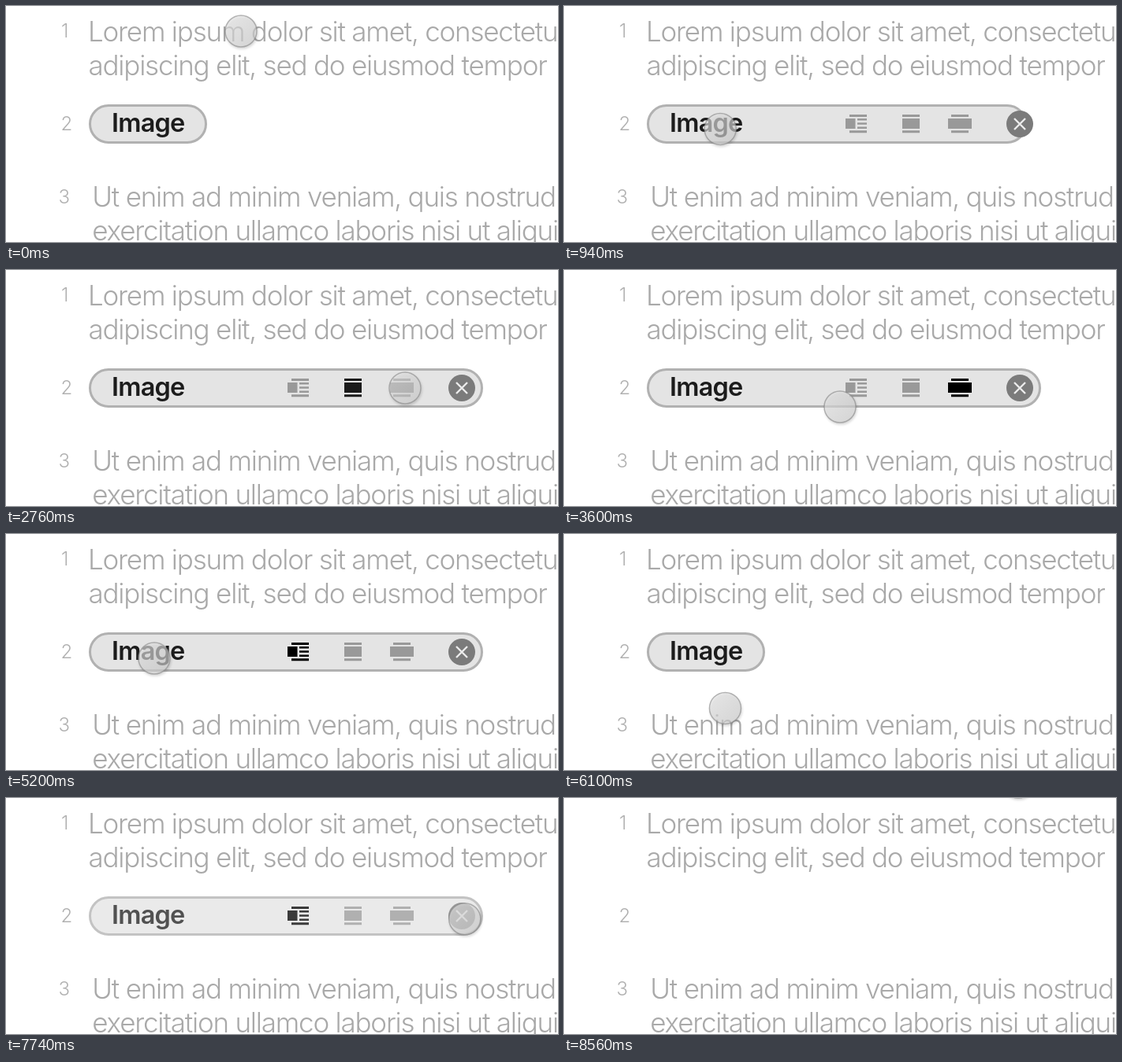
Animation of 700 by 300 pixels, one loop 8.58 s. Source, as an HTML page:

```html
<!DOCTYPE html>
<html lang="en">
<head>
<meta charset="utf-8">
<title>Image block toolbar</title>
<style>
  html, body { margin: 0; width: 100%; height: 100%; overflow: hidden; background: #fff; }
  svg { display: block; width: 700px; height: 300px; }
  text { font-family: Inter, "Liberation Sans", sans-serif; font-optical-sizing: none; }
  .body { font-size: 35px; font-weight: 300; letter-spacing: -1.22px; fill: #a9a9a9; }
  .num { font-size: 24px; font-weight: 300; fill: #b0b0b0; }
  .label { font-size: 32.5px; font-weight: 600; letter-spacing: -.8px; fill: #1c1c1c; }
  #cursor { filter: drop-shadow(1px 2px 1.5px rgba(0, 0, 0, .22)); }
</style>
</head>
<body>
<svg viewBox="0 0 700 300">
  <defs>
    <linearGradient id="glass" x1="0" y1="0" x2="1" y2="1">
      <stop offset="0" stop-color="#ececec"/>
      <stop offset="1" stop-color="#d0d0d0"/>
    </linearGradient>
  </defs>

  <text class="num" x="70" y="39.5">1</text>
  <text class="num" x="69.5" y="158">2</text>
  <text class="num" x="66.5" y="250.5">3</text>
  <text class="body" x="104" y="45">Lorem ipsum dolor sit amet, consectetur</text>
  <text class="body" x="104.5" y="88">adipiscing elit, sed do eiusmod tempor</text>
  <text class="body" x="109.3" y="255">Ut enim ad minim veniam, quis nostrud</text>
  <text class="body" x="109.3" y="298">exercitation ullamco laboris nisi ut aliquip</text>

  <g id="block">
    <rect id="pill" x="106.5" y="126.5" height="47" rx="23.5" fill="#e4e4e4" stroke="#b1b1b1" stroke-width="3"/>
    <text class="label" x="134" y="160">Image</text>
    <g id="tools">
      <path class="icon"/>
      <path class="icon"/>
      <path class="icon"/>
      <circle cx="578" cy="150" r="17" fill="#7b7b7b"/>
      <path d="M571 143l14 14M585 143l-14 14" stroke="#ececec" stroke-width="2.4"/>
    </g>
  </g>

  <circle id="cursor" r="20" fill="url(#glass)" fill-opacity=".64" stroke="#858585" stroke-opacity=".6" stroke-width="1.5"/>
</svg>

<script>
const LOOP = 8580;
const $ = id => document.getElementById(id);
const pill = $('pill'), tools = $('tools'), block = $('block'), cursor = $('cursor');
const icons = document.querySelectorAll('.icon');

const clamp = v => Math.min(1, Math.max(0, v));
const ramp = (t, start, len) => clamp((t - start) / len);
const smooth = p => p * p * (3 - 2 * p);
const easeOut = p => 1 - (1 - p) ** 3;
const mix = (a, b, p) => a + (b - a) * p;

// Icons: a bar above and below a picture, the first with text lines beside it
const bar = (x, y, w, h) => `M${x} ${y}h${w}v${h}h${-w}z`;
const iconShape = (barX, boxX, boxW) =>
  bar(barX, 138, 22, 3) + bar(boxX, 143, boxW, 13) + bar(barX, 158.3, 22, 3);
const textLines = [0, 1, 2].map(i => bar(372, 143 + i * 5.2, 12, 2.6)).join('');
[
  iconShape(362, 357, 12.5) + textLines,
  iconShape(429, 429, 22),
  iconShape(491, 487, 30)
].forEach((d, i) => icons[i].setAttribute('d', d));

// Cursor moves: start, end, place, downward bend
const home = [298, 32];
const moves = [
  [0, 660, [165, 152], 0],
  [700, 1640, [368, 152], 8],
  [1680, 2040, [440, 150], 0],
  [2320, 2720, [506, 150], 0],
  [2820, 3320, [490, 176], 0],
  [3330, 3600, [350, 174], 9],
  [3640, 4200, [370, 152], 0],
  [4340, 5140, [188, 158], 38],
  [5280, 5420, [173, 152], 0],
  [5600, 5980, [208, 231], 0],
  [6040, 6320, [179, 152], 0],
  [6380, 7180, [582, 150], 18],
  [7660, 7900, [581, 164], 0],
  [7900, 8560, [576, -20], 0]
];

function cursorAt(t) {
  let [x, y] = home;
  for (const [start, end, [toX, toY], bend] of moves) {
    const p = smooth(ramp(t, start, end - start));
    x = mix(x, toX, p);
    y = mix(y, toY, p) + bend * 4 * p * (1 - p);
  }
  return [x, y];
}

// Toolbar opens, closes and opens again
const opened = (t, len, ease) =>
  ease(ramp(t, 740, len)) - ease(ramp(t, 5500, len)) + ease(ramp(t, 6400, len));

// Selected icon from each time on
const picks = [[1640, 0], [2250, 1], [2720, 2], [4320, 0]];
const iconLevel = (t, n) => picks.reduce(
  (level, [start, pick]) => mix(level, pick === n ? 1 : 0, ramp(t, start, 240)), 0);

function draw(t) {
  pill.setAttribute('width', mix(147, 497, opened(t, 320, easeOut)));
  tools.setAttribute('opacity', opened(t, 140, p => p));
  block.setAttribute('opacity', 1 - ramp(t, 7680, 260));
  icons.forEach((icon, n) => {
    const g = Math.round(mix(153, 0, iconLevel(t, n)));
    icon.setAttribute('fill', `rgb(${g},${g},${g})`);
  });
  cursor.setAttribute('transform', `translate(${cursorAt(t)})`);
}

const begin = performance.now();
function tick() {
  draw((performance.now() - begin) % LOOP);
  requestAnimationFrame(tick);
}
draw(0);
requestAnimationFrame(tick);
</script>
</body>
</html>
```
